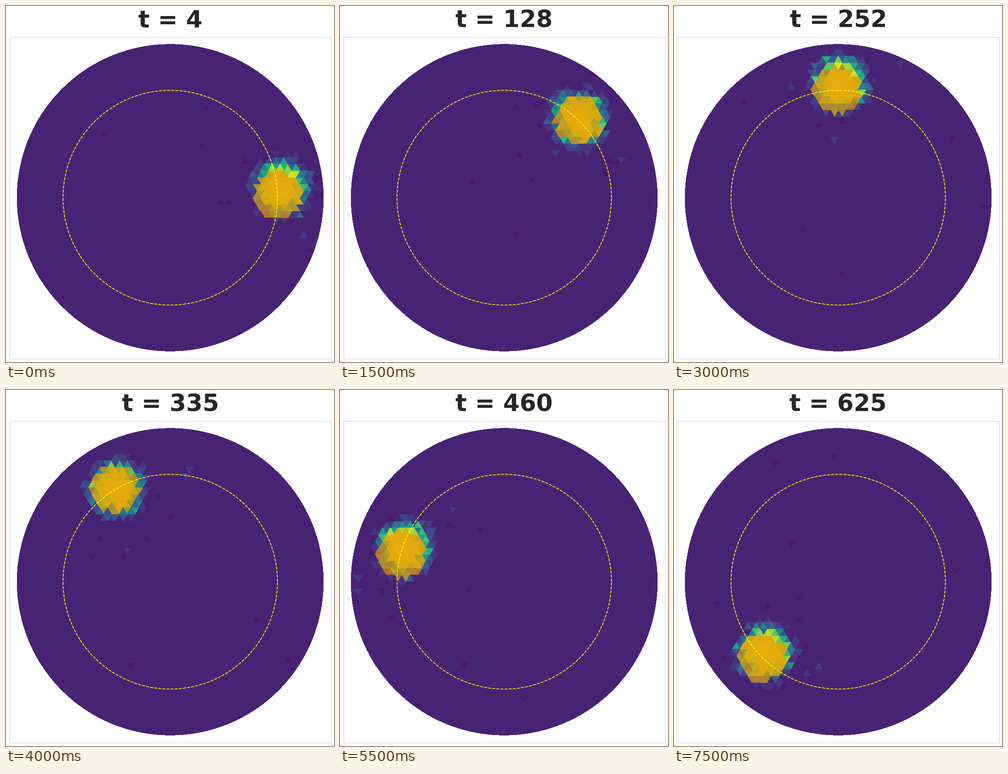
A matplotlib script that plays this animation: 719 by 779 pixels, repeating every 8000 ms.

```python
import numpy as np
import matplotlib.pyplot as plt
from matplotlib.animation import FuncAnimation
from matplotlib.collections import PolyCollection
from matplotlib.patches import Rectangle
from matplotlib.tri import Triangulation

W, H = 719, 779
FRAMES, INTERVAL = 16, 500
CENTER = np.array([360, 419.5])
R_DISK, R_PATH, R_STIM = 335.7, 235, 52
DX, DY = 17.2, 14.75
REST = 0.095
ORANGE, MIX = np.array([226, 146, 8]) / 255, 0.7


def polar(r, a):
    """Stage position at radius r and counterclockwise angle a."""
    return CENTER + np.stack([r * np.cos(a), -r * np.sin(a)], axis=-1)


def build_mesh():
    """Triangular lattice clipped to the disk, closed by a ring of rim points."""
    j, i = np.mgrid[-23:24, -21:22]
    x = (i + 0.5 * (j % 2 == 0)) * DX
    y = j * DY
    keep = np.hypot(x, y) < R_DISK - 9
    lattice = CENTER + np.column_stack([x[keep], y[keep]])
    rim = polar(R_DISK, np.linspace(0, 2 * np.pi, 122, endpoint=False))
    pts = np.vstack([lattice, rim])
    return pts[Triangulation(*pts.T).triangles]


cells = build_mesh()
mid = cells.mean(axis=1)
viridis = plt.get_cmap("viridis")


def dist(p):
    return np.hypot(*(mid - p).T)


def clock(k):
    return 4.4 + 41.42 * k


def drift(k):
    """Offset of the activity bump from the stimulus."""
    c = np.cos(2 * np.pi * k / 5.4)
    return np.array([5.5 + 3 * c, -9 - 6 * c])


def stray_cells(rng, p, near, far):
    """Cells scattered around p, plus a few anywhere on the disk."""
    spots = np.vstack([
        rng.normal(p, 75, (near, 2)),
        polar(R_DISK * np.sqrt(rng.random(far)), rng.uniform(0, 2 * np.pi, far)),
    ])
    return [np.argmin(dist(s)) for s in spots]


def colors(k):
    rng = np.random.default_rng(40 + k)
    stim = polar(R_PATH, 2 * np.pi * clock(k) / 1000)
    d = dist(stim + drift(k))

    # Noisy bump that fades into the resting level
    edge = d + rng.normal(0, 5.5, len(d))
    u = REST + 0.88 / (1 + np.exp((edge - 52) / 6.5))
    u[(d > 80) | (u < REST + 0.04)] = REST

    for level, near, far in ((0.07, 10, 4), (0.17, 4, 0)):
        for c in stray_cells(rng, stim, near, far):
            if d[c] > 64:
                u[c] = level

    rgb = viridis(u)[:, :3]
    inside = dist(stim) < R_STIM
    rgb[inside] = MIX * ORANGE + (1 - MIX) * rgb[inside]
    return rgb


fig = plt.figure(figsize=(W / 72, H / 72), dpi=72, facecolor="white")
ax = fig.add_axes([0, 0, 1, 1])
ax.set_xlim(0, W)
ax.set_ylim(H, 0)
ax.axis("off")

ax.add_patch(Rectangle((7.5, 67.5), 705, 704, fill=False, ec="#cccccc", lw=1))
mesh = PolyCollection(cells, edgecolors="none", antialiaseds=False)
ax.add_collection(mesh)
ax.plot(*polar(R_PATH, np.linspace(0, 2 * np.pi, 400)).T,
        color="yellow", lw=1.7, ls="--")
title = ax.text(360, 46.6, "", size=52, weight="bold", color="#262626",
                family="DejaVu Sans", ha="center", va="baseline")


def update(k):
    mesh.set_facecolor(colors(k))
    title.set_text(f"t = {int(clock(k))}")
    return mesh, title


anim = FuncAnimation(fig, update, frames=FRAMES, interval=INTERVAL,
                     repeat=True, repeat_delay=0, blit=False)
plt.show()
```
